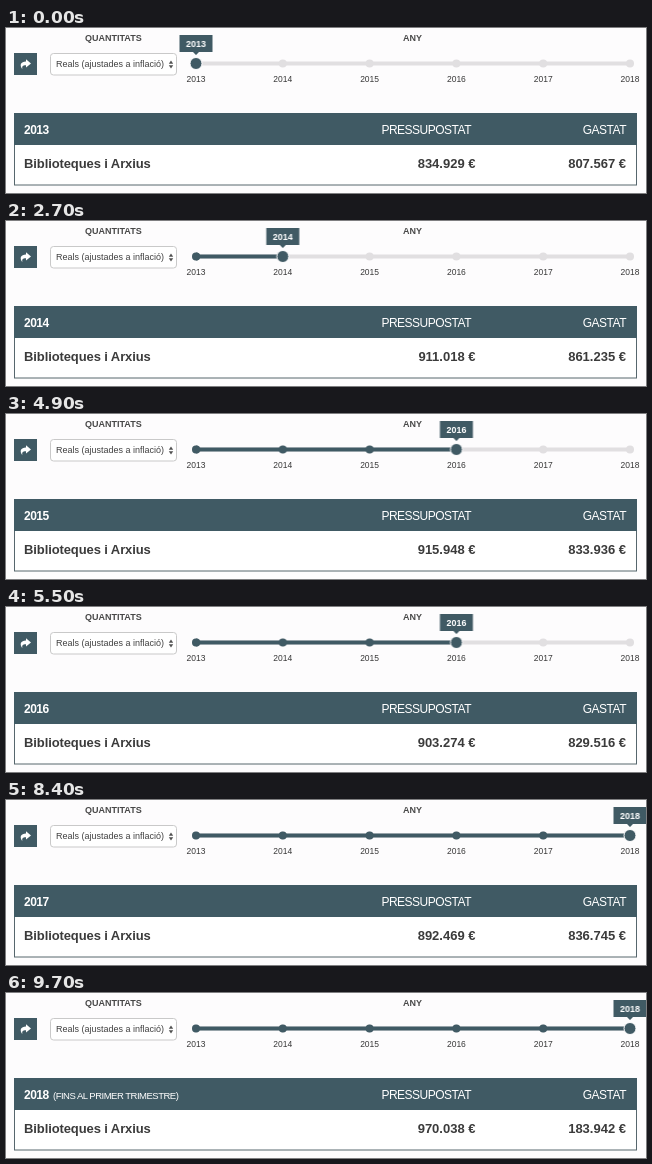
Animation, 640 px wide and 165 px high, one loop 10000 ms. Source, as an HTML page:

```html
<!DOCTYPE html>
<html lang="ca">
<head>
<meta charset="utf-8">
<title>Pressupost per any</title>
<style>
  html, body { margin: 0; width: 100%; height: 100%; overflow: hidden; background: #fdfcfd; }
  svg { display: block; }
  .stage { width: 640px; height: 165px; font-family: "Liberation Sans", Arial, sans-serif; --dark: #405a64; --light: #e1dfe1; }
  .dark { fill: var(--dark); }
  .light { fill: var(--light); }
  .caption { font: bold 9px "Liberation Sans", Arial, sans-serif; fill: #484848; }
  .tick { font-size: 8.5px; fill: #383838; text-anchor: middle; }
  .tip { font-size: 9px; font-weight: bold; fill: #fff; text-anchor: middle; }
  .head { font-size: 12px; letter-spacing: -.5px; fill: #fff; }
  .note { font-size: 9.5px; }
  .cell { font-size: 13px; font-weight: bold; fill: #3b3b3b; }
  .name { letter-spacing: -.1px; }
  .end { text-anchor: end; }
  .bold { font-weight: bold; }

  /* Each strip jumps one step per year; --x and --y are the step sizes. */
  .slide { --x: 86.8px; --y: 0px; animation: pick 10s step-end infinite; }
  .years { --x: 0px; --y: -30px; animation: pick 10s step-end infinite; }
  .rows { --x: 0px; --y: -80px; animation: load 10s step-end infinite; }
  @keyframes pick {
    0% { transform: translate(0, 0); }
    9% { transform: translate(var(--x), var(--y)); }
    30% { transform: translate(calc(2 * var(--x)), calc(2 * var(--y))); }
    49% { transform: translate(calc(3 * var(--x)), calc(3 * var(--y))); }
    66% { transform: translate(calc(4 * var(--x)), calc(4 * var(--y))); }
    84%, 100% { transform: translate(calc(5 * var(--x)), calc(5 * var(--y))); }
  }
  @keyframes load {
    0% { transform: translate(0, 0); }
    10% { transform: translate(var(--x), var(--y)); }
    31% { transform: translate(calc(2 * var(--x)), calc(2 * var(--y))); }
    50% { transform: translate(calc(3 * var(--x)), calc(3 * var(--y))); }
    66% { transform: translate(calc(4 * var(--x)), calc(4 * var(--y))); }
    85%, 100% { transform: translate(calc(5 * var(--x)), calc(5 * var(--y))); }
  }
</style>
</head>
<body>
<svg class="stage" viewBox="0 0 640 165">
  <rect width="640" height="165" fill="#fdfcfd"/>
  <text class="caption" x="79" y="13">QUANTITATS</text>
  <text class="caption" x="397" y="13">ANY</text>

  <!-- Share button -->
  <rect class="dark" x="8" y="25" width="23" height="22"/>
  <path fill="#fff" d="M20 31.2 25 35.4 20 39.6V37.2C17 37.1 15.7 38 16.4 41.2 13.2 37.3 14.7 33.6 20 33.6Z"/>

  <!-- Quantity menu -->
  <rect x="44.5" y="25.5" width="126" height="21.5" rx="3" fill="#fff" stroke="#c9c9c9"/>
  <text x="50" y="39" font-size="9" fill="#404040">Reals (ajustades a inflació)</text>
  <path fill="#505050" d="M162.8 35.7 165 32.4 167.2 35.7ZM162.8 37.3H167.2L165 40.6Z"/>

  <!-- Year slider -->
  <rect class="light" x="190" y="33.5" width="434" height="4"/>
  <g id="ticks"></g>
  <circle class="dark" cx="190" cy="35.5" r="4"/>
  <svg x="190" y="25" width="450" height="20">
    <g class="slide">
      <rect class="dark" x="-434" y="8.5" width="434" height="4"/>
      <path d="M0 10.5H-434" fill="none" stroke="var(--dark)" stroke-width="8" stroke-linecap="round" stroke-dasharray="0 86.8"/>
    </g>
  </svg>
  <g class="slide">
    <circle class="dark" cx="190" cy="35.5" r="6" stroke="#fdfcfd"/>
    <path class="dark" d="M173.5 7H206.5V24H193L190 27 187 24H173.5Z"/>
    <svg x="173.5" y="7" width="33" height="17"><g class="years" id="years"></g></svg>
  </g>

  <!-- Table -->
  <rect x="8.5" y="85.5" width="622" height="71.5" fill="#fff" stroke="#56666d"/>
  <rect class="dark" x="8" y="85" width="623" height="32"/>
  <text class="head end" x="465" y="105.5">PRESSUPOSTAT</text>
  <text class="head end" x="620" y="105.5">GASTAT</text>
  <text class="cell name" x="18" y="140">Biblioteques i Arxius</text>
  <svg x="8" y="85" width="623" height="72"><g class="rows" id="rows"></g></svg>
</svg>
<script>
  const budget = [
    [2013, "834.929", "807.567"],
    [2014, "911.018", "861.235"],
    [2015, "915.948", "833.936"],
    [2016, "903.274", "829.516"],
    [2017, "892.469", "836.745"],
    [2018, "970.038", "183.942", "(FINS AL PRIMER TRIMESTRE)"]
  ];
  const fill = (id, draw) => {
    document.getElementById(id).innerHTML = budget.map(draw).join("");
  };

  fill("ticks", ([year], i) => {
    const x = 190 + i * 86.8;
    return `<circle class="light" cx="${x}" cy="35.5" r="4"/>
      <text class="tick" x="${x}" y="54">${year}</text>`;
  });
  fill("years", ([year], i) => `<text class="tip" x="16.5" y="${12 + i * 30}">${year}</text>`);
  fill("rows", ([year, planned, spent, note = ""], i) => `
    <g transform="translate(0 ${i * 80})">
      <text class="head bold" x="10" y="20.5">${year}</text>
      <text class="head note" x="39" y="20.5">${note}</text>
      <text class="cell end" x="461.5" y="55">${planned} €</text>
      <text class="cell end" x="612" y="55">${spent} €</text>
    </g>`);
</script>
</body>
</html>
```
